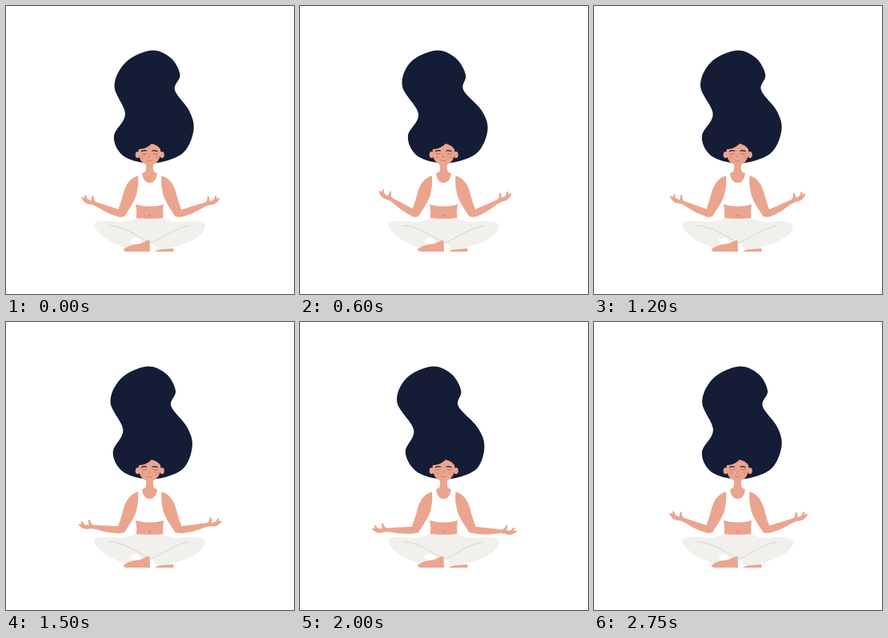
An HTML page for the animation above (2800 ms loop, 360 px wide and 360 px high).

```html
<!DOCTYPE html>
<html>
<head>
<meta charset="utf-8">
<style>
html, body { margin: 0; width: 100%; height: 100%; overflow: hidden; background: #fff; }
svg { display: block; width: 100vw; height: 100vh; }
.skin { fill: #eba58e; }
.line { fill: none; stroke-linecap: round; }
</style>
</head>
<body>
<svg viewBox="0 0 360 360">
  <defs>
    <path id="upper" d="M165 212C155 215 149 224 146.500 235C144 245 141 252 139 259C138.500 263 143 265 148 263C153 255 160 246 163 236C165 228 166 220 165 212Z"/>
    <path id="fore" d="M0-5C-12-4-24-3-35-2C-38-2-39-5-41-8Q-43-8-42-5L-41-1L-46-1C-48-2-49-5-51-5Q-52-4-50-1L-53-1Q-55 0-53 1C-49 4-46 5-42 4Q-37 2-31 3C-20 5-10 5-1 4C4 2 4-4 0-5Z"/>
    <g id="side">
      <ellipse class="skin" cx="164.500" cy="186" rx="2.800" ry="4"/>
      <use href="#upper" class="skin"/>
    </g>
  </defs>

  <path fill="#f1f0ec" d="M110 274C110 268 121 268 143 270Q155 269 163 265Q180 268 197 265Q205 270 217 270C236 268 248 269 249 275C249 290 214 304 187 304L180 296L150 302C132 297 114 286 110 274Z"/>
  <ellipse fill="#fff" cx="162" cy="294" rx="6" ry="4"/>
  <path fill="#fff" d="M182 296Q186 297 187 304L181 306Z"/>
  <path class="line" stroke="#d5d1cb" stroke-width=".9" d="M129 274.500C147 275 162 287 181 296M229 275C213 277 201 287 182 296"/>
  <path class="skin" d="M147 304C153 299 161 298 169 297Q175 293 179.500 293L180 307H151Q147 307 147 304ZM186 307C191 303 200 304 208 303Q211 304 209 307Z"/>

  <path id="hair" fill="#141c36"/>

  <path class="skin" d="M175 194V204Q175 208 170 209C171 217 174 221 179.500 221C185 221 188 217 189 209Q184 208 184 204V194Z"/>
  <path class="skin" d="M162 248Q180 253 197 248Q195.500 257 196.500 265Q180 267 163 265Q164 257 162 248Z"/>
  <path class="line" stroke="#b9614f" d="M179.500 261.500v1"/>
  <use href="#side"/>
  <use href="#side" transform="translate(359.500) scale(-1 1)"/>
  <use href="#fore" class="skin" id="left"/>
  <g transform="translate(361) scale(-1 1)"><use href="#fore" class="skin" id="right"/></g>

  <path class="skin" d="M166 179C173 179 178 176 182 172Q190 174 193 179C195 190 188 199 179.500 199C171 199 164 190 166 179Z"/>
  <g fill="#e98a78" opacity=".5"><circle cx="171" cy="189" r="2.400"/><circle cx="188.500" cy="189" r="2.400"/></g>
  <g class="line">
    <path stroke="#141c36" stroke-width="1.300" d="M169.500 181.500q3-1.500 6-.5M183 181q3-1 6 .5"/>
    <path stroke="#8a5f5f" stroke-width=".7" d="M170 184.500q3 1.500 5.500 0M184 184.500q3 1.500 5.500 0"/>
    <path stroke="#c87060" stroke-width=".8" d="M175.800 192.500q3.500 3 7 0M179.500 186.500l-1 3"/>
  </g>
</svg>
<script>
const LOOP = 2800, STEP = 50, TAU = 2 * Math.PI;
const get = id => document.getElementById(id);
const clamp = (v, max) => Math.min(max, Math.max(0, v));

// Cosine-eased progress from time a to time b
const ease = (t, a, b) => (1 - Math.cos(Math.PI * clamp((t - a) / (b - a), 1))) / 2;

// Rest, lift, sink, and return to rest
const armAngle = t => 23 + 13 * ease(t, 150, 830) - 37 * ease(t, 830, 1820) + 24 * ease(t, 1820, 2650);

// The tip swings twice per loop, the second time less
function sway(t) {
  const wave = Math.sin(TAU * t / LOOP);
  return -(9 + 3 * wave) * Math.abs(wave) ** 1.3;
}
const lean = t => -5.2 * (ease(t, 1150, 1950) - ease(t, 1950, 2750));

const outline = [
  [182, 55.5], [206, 65], [217.5, 86], [211, 105], [229, 131], [234.5, 155], [222, 183],
  [192, 195.5], [164, 194.5], [143, 184], [135, 162], [149, 135], [135.5, 100], [150, 70]
];

// Higher points follow the motion more
const bend = (x, y, t) => x + sway(t) * clamp((140 - y) / 60, 1) + lean(t) * clamp((190 - y) / 45, 2.1);

function smoothLoop(points) {
  const n = points.length, at = i => points[(i + n) % n];
  const handle = (i, s) => at(i).map((v, k) => v + s * (at(i + 1)[k] - at(i - 1)[k]) / 6);
  return 'M' + points[0] + points.map((_, i) =>
    `C${handle(i, 1)} ${handle(i + 1, -1)} ${at(i + 1)}`).join('') + 'Z';
}

function turn(id, angle) {
  get(id).setAttribute('transform', `translate(144 260.5) rotate(${angle})`);
}

const start = performance.now();
function draw() {
  const t = Math.floor((performance.now() - start) % LOOP / STEP) * STEP;
  get('hair').setAttribute('d', smoothLoop(outline.map(([x, y]) => [bend(x, y, t), y])));
  turn('left', armAngle(t));
  turn('right', armAngle(t - 100) - 1);
  requestAnimationFrame(draw);
}
draw();
</script>
</body>
</html>
```
